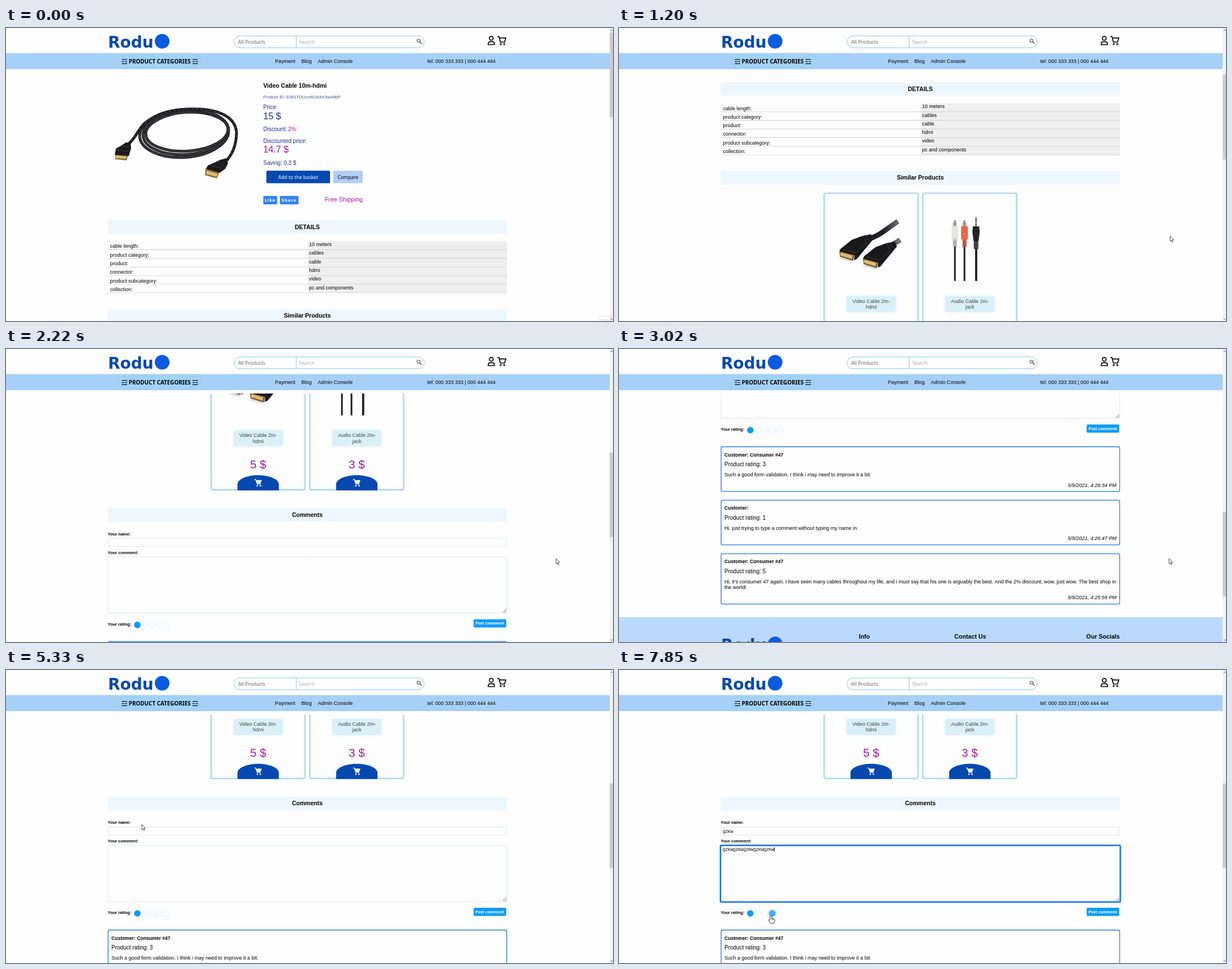
Recreate the animation shown at these times as an HTML page with a canvas. Size 1077 by 520 pixels, loop 8000 ms.

```html
<!DOCTYPE html>
<html lang="en">
<head>
<meta charset="utf-8">
<title>Shop page</title>
<style>
html, body { margin: 0; width: 100%; height: 100%; overflow: hidden; background: #fefefe; }
canvas { display: block; }
</style>
</head>
<body>
<canvas id="stage" width="1077" height="520"></canvas>
<script>
const ctx = document.getElementById('stage').getContext('2d');
const LOOP = 8000, TICK = 100.7, NOTCH = 57.6;
const SANS = '"Liberation Sans", Arial, sans-serif';
const NOTO = '"Noto Sans", "Open Sans", sans-serif';
const DEJA = '"DejaVu Sans", sans-serif';
const MONO = '"Liberation Mono", monospace';
const NAVY = '#22308c', PURPLE = '#a616a6', BLUE = '#0549b0', SKY = '#0b9bfb';

// Keys are [tick, value, ...], values run straight between them.
const scrollKeys = [[4, 0], [9, 3], [12, 4.25], [13, 5], [14, 5], [18, 8], [19, 8], [22, 10],
  [24, 10], [27, 14], [28, 14], [30, 16], [43, 16], [44, 15.6], [48, 13], [52, 11]];
const pointerKeys = [[0, 1100, 540], [1, 1070, 515], [5, 978, 369], [13, 978, 369], [15, 976, 372],
  [31, 976, 372], [36, 500, 235], [39, 399, 213], [43, 430, 257], [47, 430, 257], [53, 241, 274],
  [56, 232, 286], [62, 232, 286], [65, 266, 395], [73, 266, 395], [75, 267, 464], [77, 267, 446], [78, 269, 437]];
const nameKeys = [[58, 0], [62, 4]];
const commentKeys = [[65, 0], [66, 1], [67, 3], [68, 6], [69, 6], [73, 20]];

function at(keys, tick) {
  if (tick <= keys[0][0]) return keys[0].slice(1);
  for (let i = 1; i < keys.length; i++) {
    const [a, b] = [keys[i - 1], keys[i]];
    if (tick <= b[0]) {
      const u = (tick - a[0]) / (b[0] - a[0]);
      return a.slice(1).map((v, j) => v + (b[j + 1] - v) * u);
    }
  }
  return keys[keys.length - 1].slice(1);
}

// y is the middle of the capitals.
function text(s, x, y, size, { color = '#000', style = '', font = SANS, align = 'left', gap = 0 } = {}) {
  ctx.font = `${style} ${size}px ${font}`;
  ctx.letterSpacing = gap + 'px';
  ctx.textAlign = align;
  ctx.fillStyle = color;
  ctx.fillText(s, x, y + size * 0.33);
}
const bold = (s, x, y, size, more) => text(s, x, y, size, { style: 'bold', ...more });

function rect(x, y, w, h, color, r = 0) {
  ctx.fillStyle = color;
  ctx.beginPath();
  ctx.roundRect(x, y, w, h, r);
  ctx.fill();
}
function frame(x, y, w, h, color, width = 1, r = 0) {
  ctx.strokeStyle = color;
  ctx.lineWidth = width;
  ctx.beginPath();
  ctx.roundRect(x, y, w, h, r);
  ctx.stroke();
}
function disc(x, y, r, fill, stroke, width = 1) {
  ctx.beginPath();
  ctx.arc(x, y, r, 0, 7);
  if (fill) { ctx.fillStyle = fill; ctx.fill(); }
  if (stroke) { ctx.strokeStyle = stroke; ctx.lineWidth = width; ctx.stroke(); }
}
function path(d, fill, stroke, width = 1) {
  const p = new Path2D(d);
  if (fill) { ctx.fillStyle = fill; ctx.fill(p); }
  if (stroke) { ctx.strokeStyle = stroke; ctx.lineWidth = width; ctx.stroke(p); }
}
function shifted(x, y, draw) {
  ctx.save();
  ctx.translate(x, y);
  draw();
  ctx.restore();
}
function glow(color, blur, draw) {
  ctx.save();
  ctx.shadowColor = color;
  ctx.shadowBlur = blur;
  draw();
  ctx.restore();
}

function logo() {
  bold('Rodu', 181, 26, 28, { font: DEJA, color: BLUE });
  disc(277, 23.5, 13, '#0a5be0');
}

function cartIcon(x, y, color) {
  shifted(x, y, () => {
    path('M-6.5 -6H-4.5L-1.5 2H5', null, color, 1.3);
    path('M-4 -4.8H6.5L4 1H-1.8Z', color);
    disc(-1.5, 5.2, 1.4, color);
    disc(4, 5.2, 1.4, color);
  });
}

function header() {
  rect(0, 0, 1071, 79, '#fefefe');
  logo();
  frame(404.5, 14, 337.5, 21, '#86c8dc', 1, 10.5);
  path('M515 14V35', null, '#86c8dc');
  text('All Products', 412, 25, 8.6, { font: NOTO, color: '#666' });
  text('Search', 520, 25, 8.6, { font: NOTO, color: '#aaa' });
  disc(732, 22.5, 2.7, null, '#555', 1.1);
  path('M734 24.5L737.5 28', null, '#555', 1.4);
  disc(861, 18.3, 3.4, null, '#000', 1.7);
  path('M855.6 29.5V27.5Q856 24.3 859 24.3H863Q866.4 24.3 866.6 27.5V29.5Z', null, '#000', 1.7);
  path('M872 15.2H874.6L877.2 25H884.6L886.8 17.6H875.5', null, '#000', 1.7);
  disc(877.8, 28.6, 1.2, null, '#000', 1.2);
  disc(884, 28.6, 1.2, null, '#000', 1.2);

  rect(0, 44.5, 1071, 28.5, '#a6d0f8');
  glow('#98d2f6', 8, () => rect(203, 50, 140, 18, '#a2d2f8', 3));
  for (const x of [205.5, 331]) {
    rect(x, 55.3, 9.5, 1.2, '#000');
    rect(x, 59, 4, 1.2, '#000');
    rect(x + 5.5, 59, 4, 1.2, '#000');
    rect(x, 62.7, 9.5, 1.2, '#000');
  }
  bold('PRODUCT CATEGORIES', 272.7, 59.3, 9.9, { font: NOTO, align: 'center' });
  text('Payment', 477.3, 59, 9.1);
  text('Blog', 524, 59, 9.1);
  text('Admin Console', 553.3, 59, 9.1);
  text('tel: 000 333 333 | 000 444 444', 808, 59, 8.95, { align: 'center' });
}

function scrollbar(scroll) {
  rect(1071.3, 0, 5.7, 520, '#f1f1f1');
  rect(1071.3, 8 + scroll * 0.305, 5.7, 150.5, '#cbcbcb');
  path('M1072.8 5L1074.5 3L1076.2 5M1072.8 515.5L1074.5 517.5L1076.2 515.5', null, '#555', 1);
}

function coilPicture() {
  ctx.lineCap = 'round';
  for (const [x, y, rx, ry] of [[321, 184, 73, 34.5], [319, 185.5, 76, 39], [316, 187, 79, 42.5]]) {
    for (const [color, width] of [['#242426', 5], ['#626264', 0.7]]) {
      ctx.strokeStyle = color;
      ctx.lineWidth = width;
      ctx.beginPath();
      ctx.ellipse(x, y, rx, ry, -0.07, 0, 7);
      ctx.stroke();
    }
  }
  const tails = 'M217 206C230 196 233 182 245 170C268 150 305 142 345 144C390 147 409 165 409 188C408 212 400 226 389 238';
  path(tails, null, '#1c1c1e', 5);
  ctx.setLineDash([3, 5]);
  path(tails, null, '#77777a', 0.8);
  ctx.setLineDash([]);
  ctx.lineCap = 'butt';

  path('M194 223L217 225L214 235L194 233Z', '#8f6e34');
  path('M195 226L214 228L213 232L195 231Z', '#dcbd72');
  path('M213 203L221 204L222 213L218 227L193 225L195 214L204 209Z', '#1b1b1d');
  path('M198 217L217 219M206 210L220 211', null, '#454548', 0.8);
  path('M354 249L379 256L374 267L353 261Z', '#8f6e34');
  path('M356 253L376 259L373 264L355 259Z', '#dcbd72');
  path('M380 234L391 231L394 240L389 250L379 257L355 250L358 244L372 238Z', '#1b1b1d');
  path('M362 244L383 249M377 237L388 246', null, '#454548', 0.8);
}

function twinPlugPicture() {
  const fade = ctx.createLinearGradient(470, 0, 498, 0);
  fade.addColorStop(0, '#202022');
  fade.addColorStop(1, '#77777a');
  for (const [x, y, cable] of [[0, 0, 'M440 375C462 370 478 354 495 343'], [42, 13, 'M478 388C487 384 493 380 499 376']]) {
    path(cable, null, fade, 9);
    shifted(x, y, () => {
      path('M388 409L413 416L424 408L412 404Z', 'rgba(0,0,0,.12)');
      path('M391 395L418 402L415 413L392 406Z', '#75562a');
      path('M393 398L415 404L413 410L393 404Z', '#dcb977');
      path('M393 392L413 376L432 369L447 366L451 375L441 387L422 410L417 412L418 403L391 396Z', '#18181a');
      path('M397 393L420 399L440 381M433 370L441 384M438 368L446 380', null, '#454548', 0.9);
    });
  }
}

function jackPicture() {
  for (const [x, color, strain] of [[596, '#e6e6e4', '#c9c9c7'], [613, '#f46545', '#e65a3a']]) {
    rect(x - 1.5, 386, 3, 63, '#1c1c1e');
    rect(x - 1.6, 341, 3.2, 9, '#8c8c8c', 1);
    rect(x - 4, 345, 8, 7, '#c2c2c2', 1);
    rect(x - 1.2, 345, 2, 7, '#77777a');
    rect(x - 6, 351.5, 12, 24, color, 2.5);
    rect(x - 3.5, 374, 7, 14, strain, 1);
    for (let y = 378; y < 388; y += 3) rect(x - 3.5, y, 7, 0.9, 'rgba(0,0,0,.4)');
  }
  const x = 633.5;
  rect(x - 1.7, 388, 3.8, 61, '#1c1c1e');
  rect(x - 1.6, 335, 3.2, 18, '#9a9a9a', 1.5);
  for (const y of [339, 343.5, 348]) rect(x - 1.6, y, 3.2, 1.2, '#333');
  path('M628 352H639L640 362L638 378H629L627 362Z', '#242426');
  rect(x - 4, 377, 8, 15, '#2c2c2e', 1);
  for (let y = 380; y < 392; y += 3) rect(x - 4, y, 8, 0.8, '#747476');
}

function card(x, lines, price, picture) {
  ctx.save();
  ctx.beginPath();
  ctx.roundRect(x, 537, 168.5, 290, 4);
  ctx.clip();
  glow('#9bd2ea', 4, () => frame(x + 0.5, 537.5, 167.5, 289, '#8ecae6', 1.8, 4));
  ctx.restore();
  shifted(0, 244.8, picture);
  const mid = x + 84.4;
  glow('#d9f0f9', 5, () => rect(mid - 43.5, 720.5, 87, 28, '#daf0f9', 3));
  text(lines[0], mid, 729.5, 9, { color: '#444', align: 'center' });
  text(lines[1], mid, 739.7, 9, { color: '#444', align: 'center' });
  text(price, mid, 781, 20.6, { color: PURPLE, align: 'center' });
  shifted(mid, 800, () => path('M-36.7 27V16C-36.7 7 -20 0 0 0S36.7 7 36.7 16V27Z', BLUE));
  cartIcon(mid, 813.5, '#fff');
}

function bar(label, y) {
  rect(180.5, y, 708.5, 23.7, '#eef6fe');
  bold(label, 534.6, y + 12, 10.5, { align: 'center' });
}

function product() {
  coilPicture();
  bold('Video Cable 10m-hdmi', 456.5, 102.3, 10.5);
  text('Product ID: E061TDUxvWUb4K3wxMdF', 456.5, 122, 7.7, { color: '#46509c' });
  text('Price:', 456.5, 141, 10, { color: NAVY });
  text('15 $', 456.5, 156.8, 16.2, { color: NAVY });
  text('Discount:', 456.5, 180, 10, { color: NAVY });
  text('2%', 500.5, 180, 10, { color: PURPLE });
  text('Discounted price:', 456.5, 200.3, 10, { color: NAVY });
  text('14.7 $', 456.5, 216, 16.2, { color: PURPLE });
  text('Saving: 0.3 $', 456.5, 239.5, 10, { color: NAVY });
  rect(462, 253.3, 113, 22.3, BLUE, 2.5);
  text('Add to the basket', 518.5, 264.8, 8.6, { font: NOTO, color: '#fff', align: 'center' });
  rect(580.5, 253.3, 52.5, 22.3, '#b2cdf6', 2.5);
  text('Compare', 606.8, 264.8, 8.5, { font: NOTO, align: 'center' });
  rect(456.5, 298, 24.5, 15, '#3584f6', 1.5);
  rect(486, 298, 33, 15, '#3584f6', 1.5);
  bold('Like', 459, 306, 6.8, { font: DEJA, color: '#fff', gap: 0.9 });
  bold('Share', 488.7, 306, 6.8, { font: DEJA, color: '#fff', gap: 0.9 });
  text('Free Shipping', 565.5, 304.8, 10.8, { color: PURPLE });

  bar('DETAILS', 341.3);
  rect(535, 378.5, 354, 91.5, '#efefef');
  [['cable length:', '10 meters'], ['product category:', 'cables'], ['product:', 'cable'], ['connector:', 'hdmi'],
    ['product subcategory:', 'video'], ['collection:', 'pc and components']].forEach(([key, value], i) => {
    const y = 384.2 + i * 15.27;
    text(key, 184.5, y + 3.3, 9);
    text(value, 537.7, y, 9);
    rect(180.5, y + 8.9, 708.5, 0.9, '#cfcfcf');
  });
}

function form(tick) {
  const name = 'QZKW'.slice(0, at(nameKeys, tick)[0]);
  const comment = 'QZKW'.repeat(5).slice(0, at(commentKeys, tick)[0]);
  const onName = tick >= 56 && tick < 65, onComment = tick >= 65;
  const field = (y, h, focus) => {
    if (focus) glow('#6aaef5', 3, () => frame(180, y, 709.5, h, '#0b69da', 2, 1.5));
    else frame(181, y + 0.5, 707.5, h - 1, '#dfe5e8', 1);
  };
  const caret = (s, y) => rect(184 + s.length * 4.55, y - 4, 0.8, 8, '#000');

  bar('Comments', 858.6);
  bold('Your name:', 180.5, 904.2, 7.5);
  field(911.5, 15.5, onName);
  text(name, 184, 919.7, 7.58, { font: MONO });
  if (onName) caret(name, 919.7);
  bold('Your comment:', 180.5, 937.5, 7.5);
  field(944.8, 100.5, onComment);
  text(comment, 184, 952.2, 7.58, { font: MONO });
  if (onComment) caret(comment, 952.2);
  path('M880.5 1044L887.5 1037M883 1044L887.5 1039.5M885.5 1044L887.5 1042', null, '#777', 0.8);
  bold('Your rating:', 180.5, 1064.5, 7.5);
  for (let i = 0; i < 5; i++) {
    const x = 233 + i * 13, y = 1065.6;
    if (i === 0) disc(x, y, 5.8, SKY);
    else if (i === 3 && tick >= 78) glow('#7cc4f8', 5, () => disc(x, y, 5.8, '#48acf3'));
    else disc(x, y, 5.4, null, '#d8effa', 0.9);
  }
  rect(829.7, 1055.7, 57.8, 14.5, SKY, 2);
  bold('Post comment', 858.6, 1063, 7.1, { font: NOTO, color: '#fff', align: 'center' });
}

function review(y, h, who, rating, lines, date) {
  frame(181.2, y + 0.6, 707.2, h - 1.2, '#2478e4', 1.3, 2.5);
  bold('Customer: ' + who, 187, y + 14.8, 8.6);
  text('Product rating: ' + rating, 187, y + 32.2, 10);
  lines.forEach((line, i) => text(line, 187, y + 50 + i * 10.2, 9));
  text(date, 882.7, y + h - 11.7, 9.05, { style: 'italic', align: 'right' });
}

function page(tick) {
  product();
  bar('Similar Products', 498.8);
  card(363, ['Video Cable 2m-', 'hdmi'], '5 $', twinPlugPicture);
  card(538, ['Audio Cable 2m-', 'jack'], '3 $', jackPicture);
  form(tick);
  review(1094.5, 80.5, 'Consumer #47', 3,
    ['Such a good form validation. I think i may need to improve it a bit.'], '5/9/2021, 4:28:34 PM');
  review(1189.3, 80.5, '', 1,
    ['Hi, just trying to type a comment without typing my name in.'], '5/9/2021, 4:26:47 PM');
  review(1284.3, 90.5, 'Consumer #47', 5,
    ["Hi, it's consumer 47 again. I have seen many cables throughout my life, and i must say that his one is arguably the best. And the 2% discount, wow, just wow. The best shop in",
      'the world!'], '5/9/2021, 4:25:59 PM');
  rect(0, 1397.5, 1071, 140, '#bbd9fe');
  shifted(0, 1421.6, logo);
  bold('Info', 425.5, 1432, 10.7);
  bold('Contact Us', 595, 1432, 10.7);
  bold('Our Socials', 888.5, 1432, 10.7, { align: 'right' });
}

function pointer(tick) {
  const [x, y] = at(pointerKeys, tick);
  const inField = tick >= 55 && tick < 74;
  shifted(x, y, () => {
    if (tick >= 78) {
      path('M-1 0Q.5 -1.5 2 0V4L6 5Q7.5 5.5 7.3 8L6 12.5H0L-3.5 7.5Q-3.5 5.5 -1 7Z', '#fff', '#222', 0.9);
      path('M2 4V7M4 5V7', null, '#222', 0.6);
    } else if (inField) {
      path('M-2 -5H2M0 -5V5M-2 5H2', null, '#222', 0.8);
    } else {
      path('M0 0V9.5L2.1 7.6L3.5 10.8L5 10.1L3.6 7H6.3Z', '#fff', '#222', 0.8);
    }
  });
}

function draw(time) {
  const tick = Math.floor((time % LOOP + 15) / TICK);
  const scroll = at(scrollKeys, tick)[0] * NOTCH;
  rect(0, 0, 1077, 520, '#fefefe');
  ctx.save();
  ctx.beginPath();
  ctx.rect(0, 79, 1071, 441);
  ctx.clip();
  ctx.translate(0, -scroll);
  page(tick);
  ctx.restore();
  header();
  scrollbar(scroll);
  if (tick === 0) {
    frame(1052, 511.5, 30, 12, '#e6e6e6', 0.8);
    text('Pause', 1055, 518.5, 6.5, { color: '#ccc' });
  }
  pointer(tick);
}

const start = performance.now();
function loop() {
  draw(performance.now() - start);
  requestAnimationFrame(loop);
}
loop();
</script>
</body>
</html>
```
